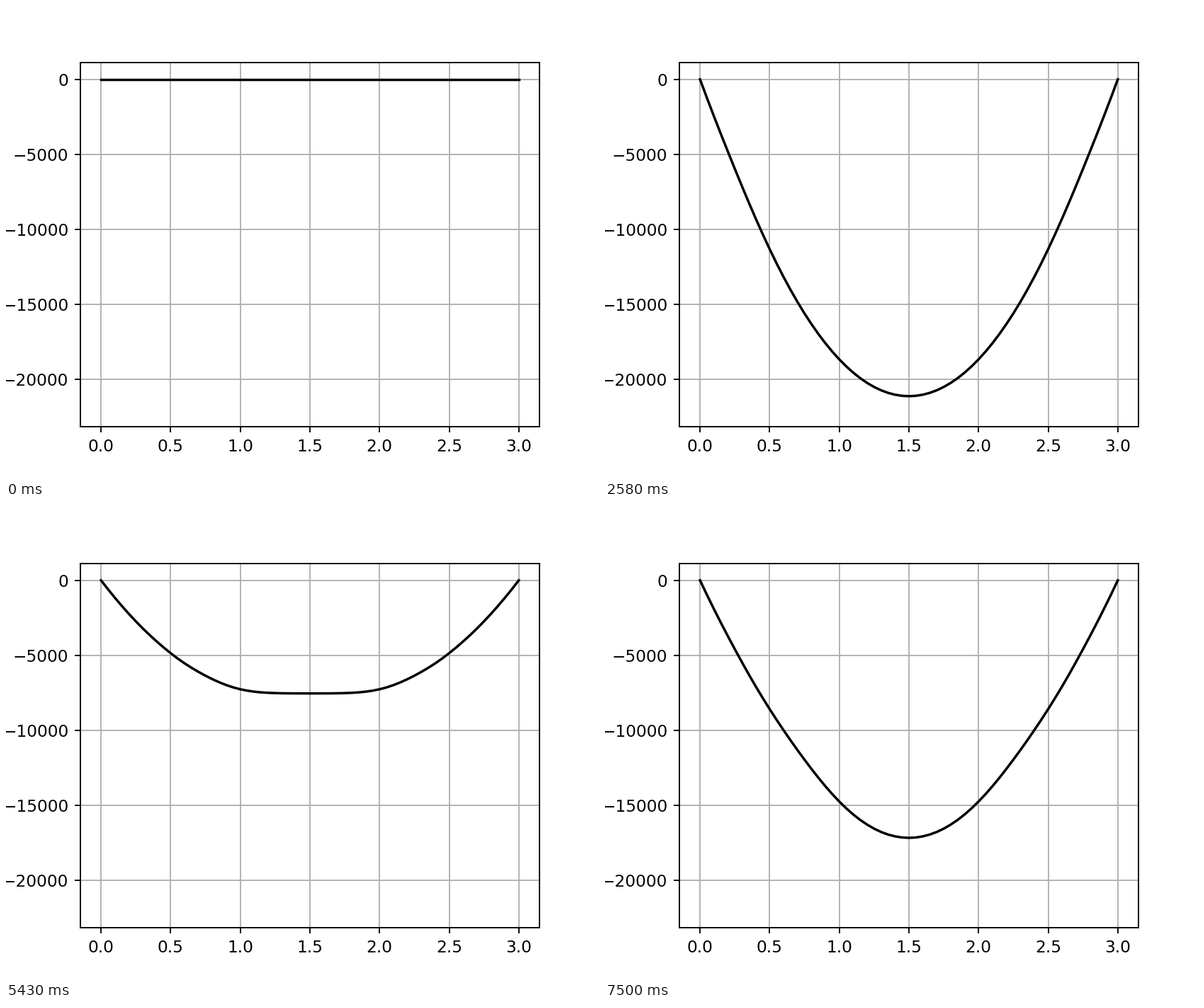
A matplotlib script that plays this animation: 837x669 px, repeating every 7.53 s.

```python
import numpy as np
import matplotlib.pyplot as plt
from matplotlib.animation import FuncAnimation

LENGTH = 3.0
CELLS = 60
LOAD = 9800.0        # uniform pull on the string, wave speed 1
FRAMES = 251
STEP_MS = 30
FRAME_DT = 0.04
SUBSTEPS = 2


def simulate():
    """Leapfrog solution of u_tt = u_xx - LOAD with fixed ends, from rest."""
    dt = FRAME_DT / SUBSTEPS
    ratio = (dt * CELLS / LENGTH) ** 2
    prev = np.zeros(CELLS + 1)
    cur = np.zeros(CELLS + 1)
    cur[1:-1] = -LOAD * dt ** 2 / 2
    states = [prev, cur]
    for _ in range(FRAMES * SUBSTEPS):
        new = np.zeros_like(cur)
        new[1:-1] = (2 * cur[1:-1] - prev[1:-1]
                     + ratio * (cur[2:] - 2 * cur[1:-1] + cur[:-2])
                     - LOAD * dt ** 2)
        prev, cur = cur, new
        states.append(cur)
    return states[::SUBSTEPS][:FRAMES]


x = np.linspace(0, LENGTH, CELLS + 1)
shapes = simulate()
depth = LOAD * LENGTH ** 2 / 4

fig = plt.figure(figsize=(5, 3.9965), dpi=167.4, facecolor="white")
ax = fig.add_axes([0.125, 0.11, 0.775, 0.77])
ax.set_xlim(-0.05 * LENGTH, 1.05 * LENGTH)
ax.set_ylim(-1.05 * depth, 0.05 * depth)
ax.set_xticks(np.arange(0, 3.1, 0.5))
ax.set_yticks(np.arange(-20000, 1, 5000))
ax.grid(True)
line, = ax.plot(x, shapes[0], color="black", lw=1.5)


def update(i):
    line.set_ydata(shapes[i])
    return line,


anim = FuncAnimation(fig, update, frames=FRAMES, interval=STEP_MS,
                     repeat=True, repeat_delay=0, blit=False)
plt.show()
```
